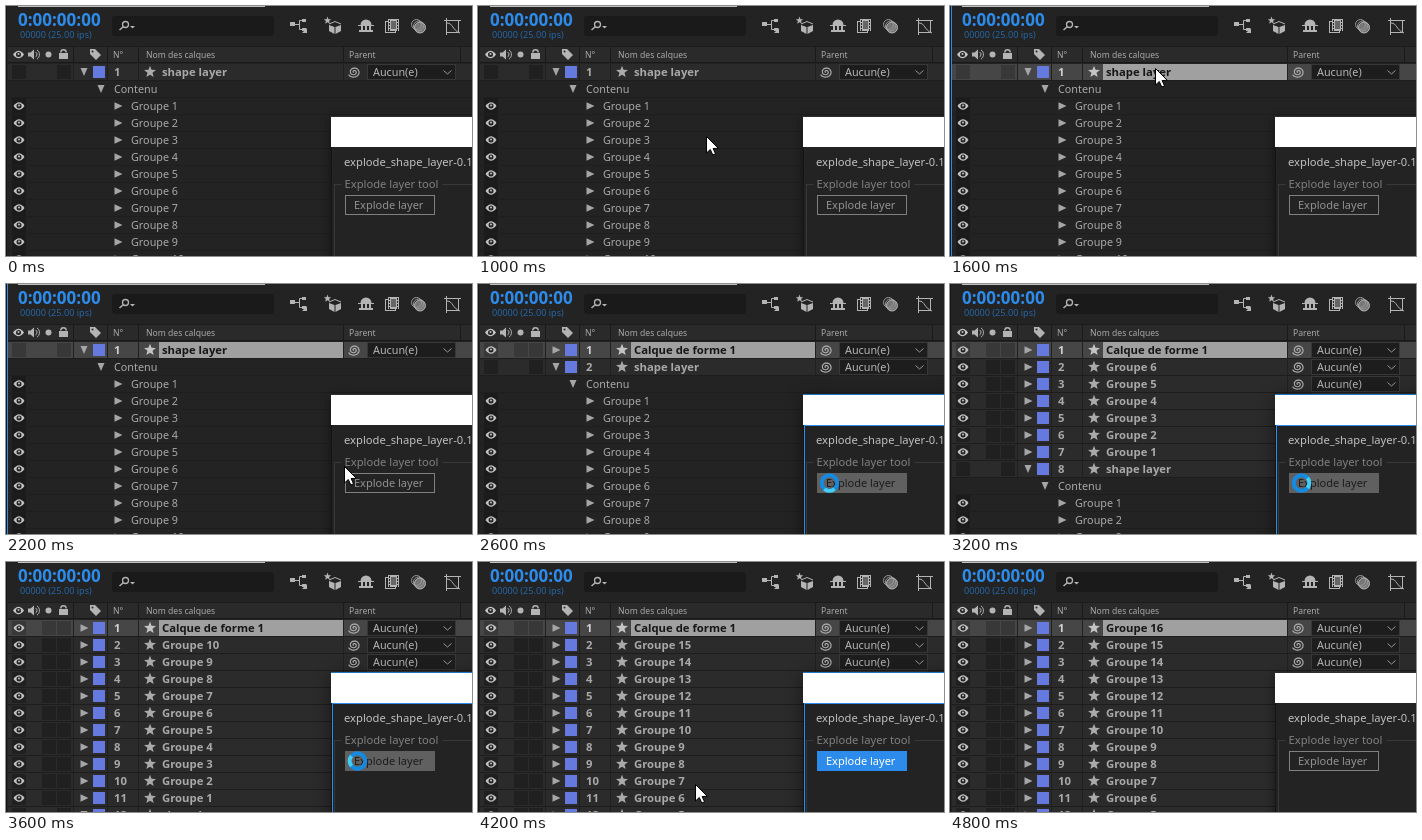
Write an HTML page with a canvas that moves like this. It is 466 px wide and 250 px high and loops after 4870 ms.

```html
<!DOCTYPE html>
<html lang="fr">
<head>
<meta charset="utf-8">
<title>Explode layer</title>
<style>
html, body { margin: 0; width: 100%; height: 100%; overflow: hidden; background: #232323; }
canvas { display: block; }
</style>
</head>
<body>
<canvas id="stage" width="466" height="250"></canvas>
<script>
const ctx = document.getElementById('stage').getContext('2d');
const LOOP = 4870, FPS = 15, ROW = 17, TOP = 58;
const FONT = '"Noto Sans", "Open Sans", sans-serif';
const BG = '#232323', CELL = '#1b1b1b', ICON = '#b4b4b4', TEXT = '#a9a9a9', BLUE = '#2d8ceb';

function rect(x, y, w, h, color) {
  ctx.fillStyle = color;
  ctx.fillRect(x, y, w, h);
}

function frame(x, y, w, h, color) {
  ctx.strokeStyle = color;
  ctx.lineWidth = 1;
  ctx.strokeRect(x + .5, y + .5, w - 1, h - 1);
}

function text(str, x, y, size = 11, color = TEXT, weight = 400) {
  ctx.font = `${weight} ${size}px ${FONT}`;
  ctx.fillStyle = color;
  ctx.fillText(str, x, y);
}

function poly(points, color) {
  ctx.beginPath();
  points.forEach(([x, y]) => ctx.lineTo(x, y));
  ctx.closePath();
  ctx.fillStyle = color;
  ctx.fill();
}

function line(points, color = ICON, width = 1) {
  ctx.beginPath();
  points.forEach(([x, y]) => ctx.lineTo(x, y));
  ctx.strokeStyle = color;
  ctx.lineWidth = width;
  ctx.stroke();
}

function disc(x, y, r, color = ICON) {
  ctx.beginPath();
  ctx.arc(x, y, r, 0, 7);
  ctx.fillStyle = color;
  ctx.fill();
}

function arc(x, y, r, color = ICON, width = 1, from = 0, to = Math.PI * 2) {
  ctx.beginPath();
  ctx.arc(x, y, r, from, to);
  ctx.strokeStyle = color;
  ctx.lineWidth = width;
  ctx.stroke();
}

function eye(x, y) {
  ctx.beginPath();
  ctx.moveTo(x - 5.5, y);
  ctx.quadraticCurveTo(x, y - 7.5, x + 5.5, y);
  ctx.quadraticCurveTo(x, y + 7.5, x - 5.5, y);
  ctx.fillStyle = '#c4c4c4';
  ctx.fill();
  disc(x, y, 2.5, '#242424');
  disc(x, y - .5, 1, '#c4c4c4');
}

function star(x, y, r, color) {
  const points = [];
  for (let i = 0; i < 10; i++) {
    const a = i * Math.PI / 5 - Math.PI / 2, d = i % 2 ? r * .42 : r;
    points.push([x + d * Math.cos(a), y + d * Math.sin(a)]);
  }
  poly(points, color);
}

function twirl(x, y, open) {
  poly(open ? [[x - 3.5, y - 4], [x + 3.5, y - 4], [x, y + 4]]
            : [[x - 3.5, y - 3.8], [x + 4.5, y], [x - 3.5, y + 3.8]], '#a6a6a6');
}

function spiral(x, y) {
  ctx.beginPath();
  for (let a = 0; a < 13.5; a += .3) {
    const r = .4 + a * .44;
    ctx.lineTo(x + r * Math.cos(a + 2), y + r * Math.sin(a + 2) * .9);
  }
  ctx.strokeStyle = ICON;
  ctx.lineWidth = 1.1;
  ctx.stroke();
}

function toolIcons() {
  // flow chart
  rect(284, 16, 5, 4, ICON);
  line([[289, 18.5], [293, 18.5]]);
  line([[297, 14.5], [293.5, 14.5], [293.5, 23.5], [297, 23.5]]);
  rect(296, 13, 4, 3, ICON);
  rect(296, 22, 4, 3, ICON);
  poly([[296, 27], [301, 27], [301, 22]], ICON);
  // 3D box
  poly([[323, 19], [328.5, 21], [328.5, 28], [323, 25]], ICON);
  poly([[329.5, 21], [335, 19], [335, 25], [329.5, 28]], ICON);
  line([[323, 18], [329, 15.5], [335, 18]]);
  star(321.5, 14.5, 4, ICON);
  // shy figure
  ctx.beginPath();
  ctx.arc(360, 19, 5.5, Math.PI, 0);
  ctx.fillStyle = ICON;
  ctx.fill();
  rect(352, 19, 16, 1, ICON);
  rect(355, 20, 2, 4, ICON);
  rect(359, 20, 2, 4, ICON);
  rect(363, 20, 2, 4, ICON);
  rect(353, 24, 14, 2, ICON);
  // frame blending
  frame(379, 15, 11, 12, ICON);
  rect(382, 13, 11, 12, ICON);
  for (let y = 14; y < 24; y += 3) {
    rect(383, y, 1, 2, BG);
    rect(391, y, 1, 2, BG);
  }
  rect(385, 15, 5, 8, '#666');
  // motion blur
  disc(414, 21.5, 5.5, '#777');
  arc(410.5, 18.5, 5, '#999');
  arc(412.5, 20, 5, '#999');
  arc(414, 21.5, 5.5);
  // graph editor
  frame(440, 14, 13, 13, ICON);
  line([[438, 14.5], [455, 14.5]]);
  line([[440.5, 12], [440.5, 29]]);
  ctx.beginPath();
  ctx.moveTo(441, 17);
  ctx.bezierCurveTo(447, 17, 446, 24, 454, 27);
  ctx.strokeStyle = ICON;
  ctx.stroke();
}

function header() {
  rect(12, 0, 247, 1, '#c0c0c0');
  text('0:00:00:00', 12, 20, 17, BLUE, 600);
  text('00000 (25.00 ips)', 14, 32, 9.1, '#2567a8');
  ctx.beginPath();
  ctx.roundRect(106, 10, 162, 20, 3);
  ctx.fillStyle = '#1a1a1a';
  ctx.fill();
  arc(119.5, 18.5, 3, ICON, 1.3);
  line([[117.3, 20.7], [113.5, 24]], ICON, 1.5);
  poly([[124, 20], [129, 20], [126.5, 22.5]], ICON);
  toolIcons();

  rect(2, 40, 464, 17, '#2a2a2a');
  rect(2, 40, 464, 1, '#1c1c1c');
  rect(2, 56, 464, 1, '#191919');
  for (const x of [67, 101, 132, 337, 454]) rect(x, 41, 1, 15, '#1a1a1a');
  eye(12.5, 48.5);
  poly([[22, 46.5], [24.5, 46.5], [28, 43.5], [28, 53.5], [24.5, 50.5], [22, 50.5]], ICON);
  arc(28, 48.5, 3, ICON, 1, -1, 1);
  arc(28, 48.5, 5.5, ICON, 1, -1, 1);
  disc(42.5, 48.5, 3);
  rect(53, 47, 9, 6, ICON);
  arc(57.5, 46.5, 2.7, ICON, 1.4, Math.PI, 0);
  poly([[84, 43], [89, 43], [95, 49], [90, 54], [84, 48]], ICON);
  disc(86.5, 45.5, 1, '#2a2a2a');
  text('N°', 107, 52, 8.6);
  text('Nom des calques', 140, 52, 8.6);
  text('Parent', 343, 52, 8.6);
}

function layerRow(i, name, { selected, open, visible = true } = {}) {
  const y = TOP + i * ROW, mid = y + 8;
  rect(2, y, 464, 16, selected ? '#464646' : '#2b2b2b');
  rect(2, y + 16, 464, 1, '#1d1d1d');
  for (const x of visible ? [6, 36, 51] : [6, 51]) rect(x, y + 1, 14, 14, selected ? '#383838' : '#202020');
  if (visible) eye(13, mid);
  for (const x of [67, 101, 132, 337]) rect(x, y, 1, 16, '#202020');
  twirl(78, mid, open);
  rect(87, mid - 6, 12, 12, '#6579de');
  text(i + 1, 108, mid + 4, 11.3, selected ? '#d0d0d0' : TEXT, 700);
  if (selected) rect(153, y, 184, 16, '#a0a0a0');
  star(144, mid, 6.3, selected ? '#c4c4c4' : '#aaa');
  text(name, 156, mid + 4, 11.3, selected ? '#161616' : TEXT, 700);
  spiral(348, mid);
  rect(361, y, 89, 16, '#1d1d1d');
  frame(361, y, 89, 16, '#383838');
  text('Aucun(e)', 367, mid + 4, 10.8, '#b6b6b6');
  line([[437.5, mid - 1.5], [441.5, mid + 2], [445.5, mid - 1.5]], '#999');
}

function contents(from) {
  for (let i = from, g = 0; TOP + i * ROW < 250; i++, g++) {
    const y = TOP + i * ROW, mid = y + 8;
    rect(2, y + 16, 464, 1, '#1e1e1e');
    if (g) {
      rect(6, y, 14, 16, CELL);
      eye(13, mid);
    }
    twirl(g ? 112 : 95, mid, !g);
    text(g ? 'Groupe ' + g : 'Contenu', g ? 125 : 108, mid + 4, 10.8);
  }
}

function layers(k) {
  if (k < 39) {
    const selected = k >= 21;
    layerRow(0, 'shape layer', { selected, open: true, visible: false });
    contents(1);
    return;
  }
  const count = k >= 60 ? 15 : Math.max(0, 2 + Math.floor((k - 42) * 2 / 3));
  layerRow(0, k >= 66 ? 'Groupe 16' : 'Calque de forme 1', { selected: true });
  for (let i = 1; i <= Math.min(count, 11); i++) layerRow(i, 'Groupe ' + (count + 1 - i));
  if (count < 11) {
    layerRow(count + 1, 'shape layer', { open: true, visible: false });
    contents(count + 2);
  }
}

function toolWindow(k) {
  const active = k >= 35 && k < 72, hover = k >= 34 && k < 60;
  ctx.save();
  ctx.shadowColor = 'rgba(0, 0, 0, .45)';
  ctx.shadowBlur = active ? 16 : 10;
  ctx.shadowOffsetY = 3;
  rect(325, 110, 160, 160, active ? '#1c76c4' : '#2e2e2e');
  ctx.restore();
  rect(325, 111, 141, 30, '#fff');
  rect(325, 141, 141, 109, BG);
  rect(325, 141, 1, 109, '#151515');
  if (active) {
    rect(326, 141, 140, 1, BLUE);
    rect(326, 141, 1, 109, BLUE);
  }
  text('explode_shape_layer-0.1', 338, 160, 11.2, '#c0c0c0');
  rect(328, 178, 8, 1, '#383838');
  rect(328, 178, 1, 72, '#383838');
  rect(436, 178, 30, 1, '#383838');
  text('Explode layer tool', 338.5, 182, 11.2, '#808080');
  if (hover) rect(339, 189, 90, 20, '#606060');
  else if (active) rect(339, 189, 90, 20, BLUE);
  else frame(339, 189, 90, 20, '#808080');
  text('Explode layer', 348, 203, 11, hover ? '#1c1c1c' : active ? '#fff' : '#929292');
}

// Pointer way: step, x, y
const WAY = [[11, 263, 232], [18, 205, 63], [24, 205, 62], [26, 206, 64],
             [33, 338, 182], [35, 346, 193], [59, 346, 193]];
const EXIT = [[60, 330, 196], [63, 217, 222], [65, 121, 245]];

function along(way, k, ease) {
  const i = way.findIndex((p, n) => n && k <= p[0]);
  const a = way[i - 1], b = way[i];
  const u = (k - a[0]) / (b[0] - a[0]), s = ease(u);
  return [a[1] + (b[1] - a[1]) * s, a[2] + (b[2] - a[2]) * s].map(Math.round);
}

function arrow(x, y) {
  const shape = [[0, 0], [0, 16.5], [3.8, 13], [6.3, 18.5], [9, 17.3], [6.6, 12], [11.8, 11.8]]
    .map(([dx, dy]) => [x + .5 + dx, y + .5 + dy]);
  poly(shape, '#fff');
  line([...shape, shape[0]], '#000', 1);
}

function pointer(k) {
  if (k >= 37 && k < 60) {
    const a = Math.PI + (k - 42) * Math.PI / 6;
    arc(351.5, 199, 7.8, '#148ae0', 4);
    arc(351.5, 199, 7.8, '#45cdf2', 4, a - .7, a + .7);
  } else if (k >= 11 && k < 60) {
    arrow(...along(WAY, k, u => u * u * (3 - 2 * u)));
  } else if (k >= 60 && k <= 65) {
    arrow(...along(EXIT, k, u => u));
  }
}

function draw(now) {
  const k = Math.floor((now % LOOP) * FPS / 1000 + .06);
  rect(0, 0, 466, 250, BG);
  rect(0, 0, 1, 250, '#161616');
  header();
  layers(k);
  if (k >= 21 && k < 35) rect(1, 0, 1, 250, BLUE);
  toolWindow(k);
  pointer(k);
}

const start = performance.now();
function tick() {
  draw(performance.now() - start);
  requestAnimationFrame(tick);
}
tick();
</script>
</body>
</html>
```
